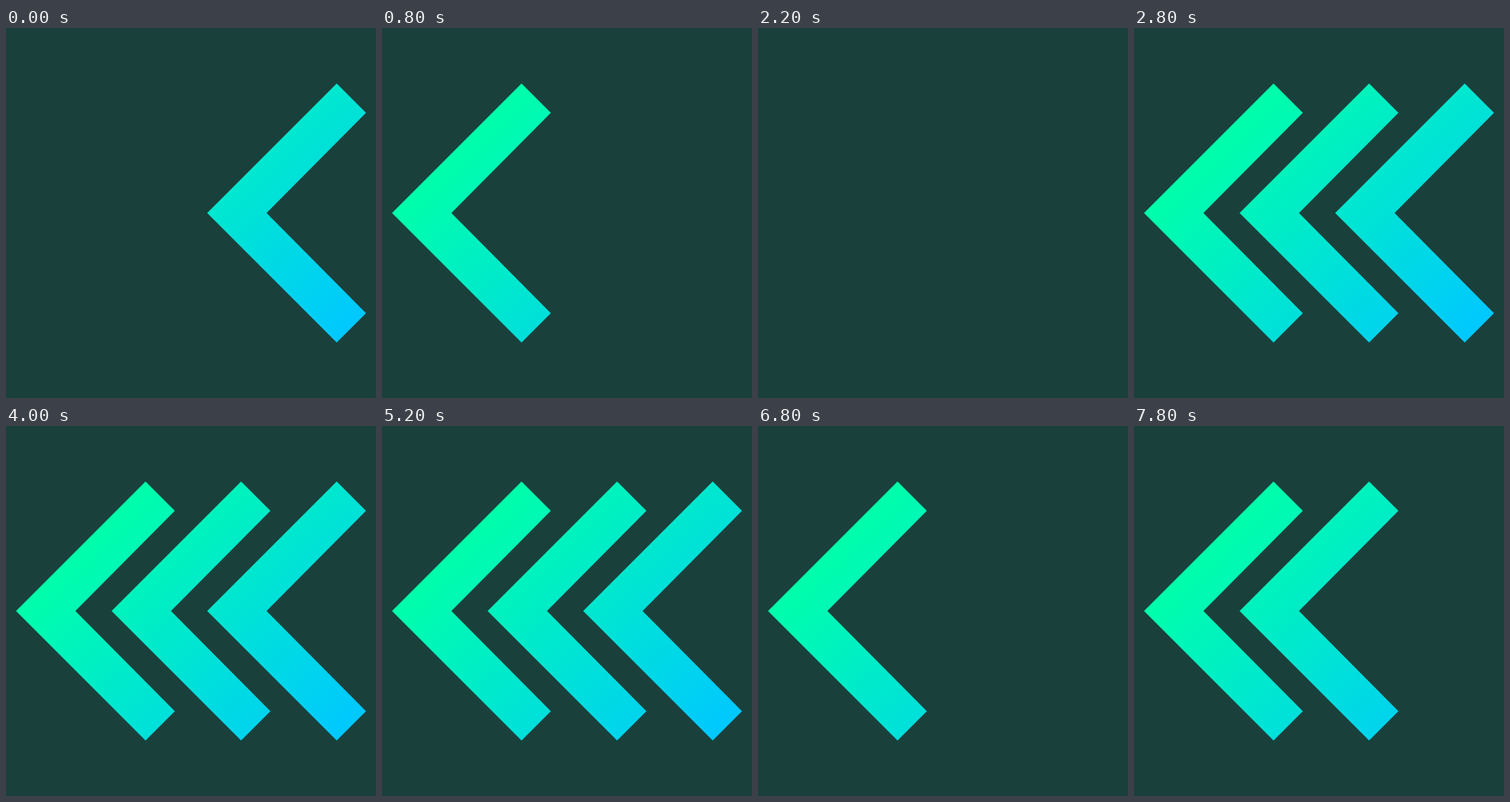
Animation, 480 px wide and 480 px high, one loop 8000 ms. Source, as an HTML page:

```html
<!DOCTYPE html>
<html lang="en">
<head>
<meta charset="utf-8">
<title>Chevrons</title>
<style>
  html, body { margin: 0; width: 100%; height: 100%; overflow: hidden; background: #1a403c; }
  svg { display: block; width: 100%; height: 100%; }
</style>
</head>
<body>
<svg viewBox="0 0 480 480">
  <defs>
    <linearGradient id="mint" gradientUnits="userSpaceOnUse" x1="126.5" y1="126.5" x2="418.5" y2="418.5">
      <stop offset="0" stop-color="#00ffaa"/>
      <stop offset="1" stop-color="#00c8ff"/>
    </linearGradient>
  </defs>
  <!-- right to left, in order of appearance -->
  <g fill="url(#mint)">
    <path d="M261 240l168-168 38 38-129 130 129 130-38 38z"/>
    <path d="M137 240l168-168 38 38-129 130 129 130-38 38z"/>
    <path d="M13 240l168-168 38 38-129 130 129 130-38 38z"/>
  </g>
</svg>
<script>
  const LOOP = 8000, STEP = 200, PHASES = 6, LIT = 3;
  const chevrons = document.querySelectorAll('path');
  const start = performance.now();

  function draw(now) {
    const time = Math.max(0, now - start) % LOOP;
    const phase = Math.floor(time / STEP) % PHASES;
    chevrons.forEach((chevron, i) => {
      const lit = phase >= i && phase < i + LIT;
      chevron.setAttribute('visibility', lit ? 'visible' : 'hidden');
    });
    requestAnimationFrame(draw);
  }
  draw(start);
</script>
</body>
</html>
```
